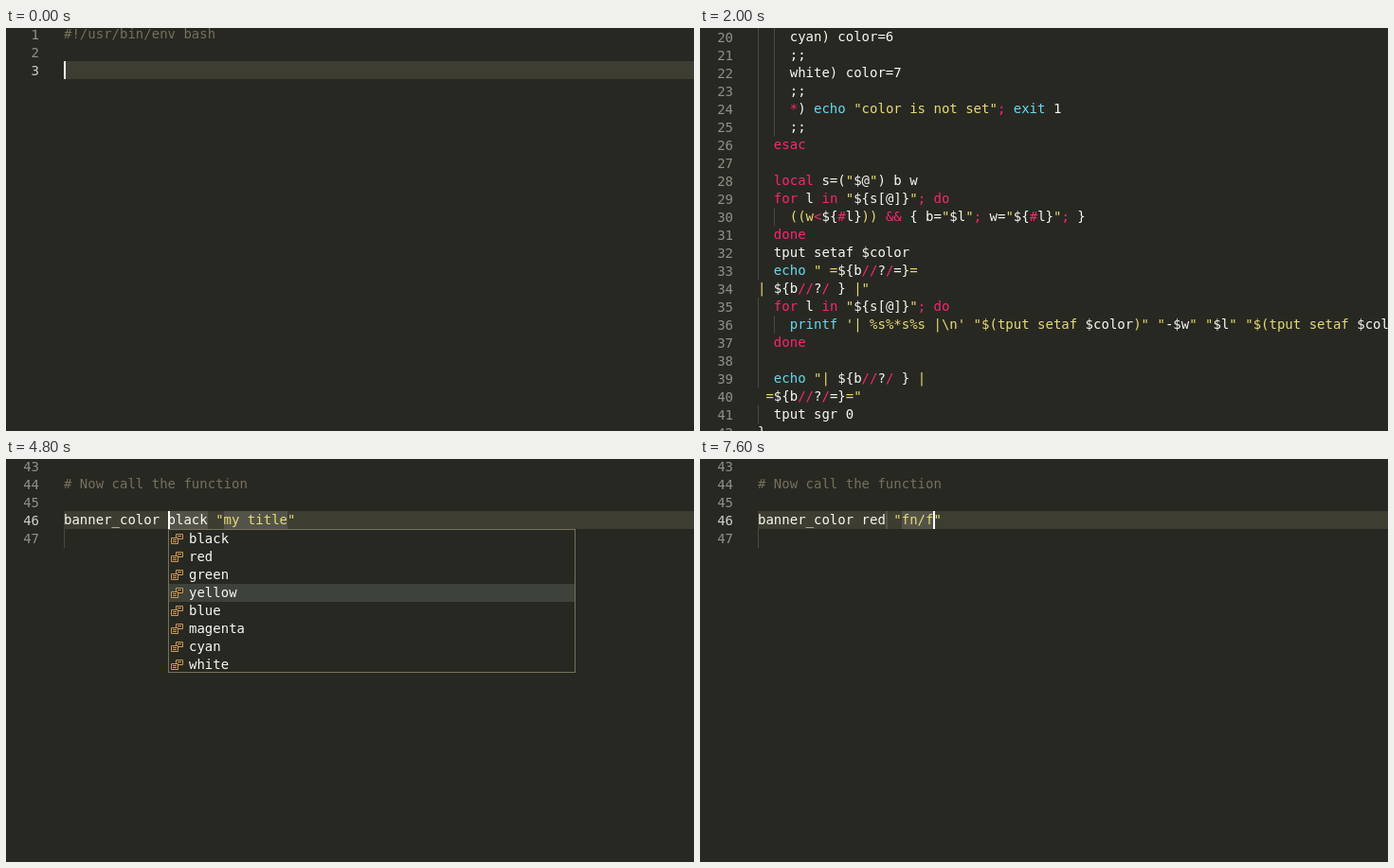
Recreate the animation shown at these times as an HTML page. Size 726x426 px, loop 8 s.

```html
<!DOCTYPE html>
<html lang="en">
<head>
<meta charset="utf-8">
<title>Bash snippets</title>
<style>
  html, body { margin: 0; width: 100%; height: 100%; overflow: hidden; background: #282822; }
  #stage { display: block; width: 726px; height: 426px; }
  text { font: 14px "DejaVu Sans Mono", monospace; white-space: pre; fill: #f8f8f2; }
  .scene { visibility: hidden; }
  .scene.on { visibility: visible; }
  .num { fill: #90908a; text-anchor: end; }
  .num.active { fill: #d0d0ca; }
  .k { fill: #f92672; }
  .y { fill: #e6db74; }
  .c { fill: #66d9ef; }
  .i { fill: #66d9ef; font-style: italic; }
  .g { fill: #a6e22e; }
  .m { fill: #75715e; }
  .d { fill: #b0b0aa; }
  .b { font-weight: bold; }
  .row { fill: #3e3d32; }
  .field { fill: #54534a; }
  .caret { fill: #fff; }
  .guide { fill: #4a4a43; }
  .box { fill: #282822; stroke: #75715e; }
  .sel { fill: #3d423b; }
  .thumb { fill: #4c4c48; }
  .snip { fill: #25252e; stroke: #c9c9cc; }
  .dots { stroke: #c9c9cc; stroke-dasharray: 1.5 1; }
  .word { fill: #282822; stroke: #cf9a55; }
</style>
</head>
<body>
<svg id="stage" width="726" height="426" viewBox="0 0 726 426"></svg>
<script>
const STEP = 400, ROW = 19, LEFT = 61, CHAR = 8.428;
const col = n => Math.round(LEFT + n * CHAR);
const esc = s => s.replace(/&/g, '&amp;').replace(/</g, '&lt;');
const rect = (cls, x, y, w, h) =>
  `<rect class="${cls}" x="${x}" y="${y}" width="${w}" height="${h}"/>`;

// "§k" switches to style k until the next mark
const paint = s => s.split('§').map((part, i) =>
  i ? `<tspan class="${part[0]}">${esc(part.slice(1))}</tspan>` : esc(part)).join('');
const text = (x, y, s, cls = '') => `<text class="${cls}" x="${x}" y="${y}">${paint(s)}</text>`;

const loop = '§kfor§w l §kin§y "§w${s[@]}§y"§k; do';
const fill = ch => '§w${b§k//§w?§k/§w' + ch + '}§y';
const tput = '"$(tput setaf §w$color§y)"';
const script = {
  20: '    cyan) color=6',
  21: '    ;;',
  22: '    white) color=7',
  23: '    ;;',
  24: '    §k*§w) §cecho §y"color is not set"§k; §cexit§w 1',
  25: '    ;;',
  26: '  §kesac',
  28: '  §klocal§w s=(§y"§w$@§y"§w) b w',
  29: '  ' + loop,
  30: '    §y((w§k<§w${§k#§wl}§y)) §k&&§w { b=§y"§w$l§y"§k;§w w=§y"§w${§k#§wl}§y"§k;§w }',
  31: '  §kdone',
  32: '  tput setaf $color',
  33: '  §cecho §y" =' + fill('=') + '=',
  34: '§y| ' + fill(' ') + ' |"',
  35: '  ' + loop,
  36: String.raw`    §cprintf §y'| %s%*s%s |\n' ` + tput + ' "§w-$w§y" "§w$l§y" ' + tput,
  37: '  §kdone',
  39: '  §cecho §y"| ' + fill(' ') + ' |',
  40: '§y =' + fill('=') + '="',
  41: '  tput sgr 0',
  42: '}',
  44: '§m# Now call the function'
};

function guides(n, y) {
  if (n === 47) return rect('guide', 61, y, 1, 20);
  if (n < 20 || n > 41 || n === 34 || n === 40) return '';
  const deep = n < 26 || n === 30 || n === 36;
  return rect('guide', 61, y, 1, ROW) + (deep ? rect('guide', 78, y, 1, ROW) : '');
}

// Lines first..last, the first one starting at y = top
function editor(first, last, top, active, lines, fields = [], caret = -1) {
  let out = '';
  for (let n = first; n <= last; n++) {
    const y = top + (n - first) * ROW;
    if (y > 426) break;
    if (n === active) {
      out += rect('row', LEFT, y, 665, ROW);
      for (const [a, b] of fields) out += rect('field', col(a), y, Math.max(2, col(b) - col(a)), ROW);
    }
    out += guides(n, y);
    out += text(35, y + 15, String(n), n === active ? 'num active' : 'num');
    if (lines[n]) out += text(LEFT, y + 14, lines[n]);
    if (n === active && caret >= 0) out += rect('caret', col(caret), y, 2, ROW);
  }
  return out;
}

const snipIcon = y => `<path class="snip" d="M4.5 ${y + 13}V${y + 3.5}h10V${y + 13}"/>` +
  `<path class="dots" d="M4 ${y + 14.5}h12"/>`;
const wordIcon = y => `<path class="word" d="M8.5 ${y + 4.5}h7v5h-7z M10 ${y + 6.5}h4"/>` +
  `<path class="word" d="M3.5 ${y + 8.5}h7v6h-7z M5 ${y + 10.5}h4 M5 ${y + 12.5}h4"/>`;

// "*" makes the next letter bold
const bold = s => s.replace(/\*(.)/g, '§b$1§w');

function list(x, y, w, items, sel, icon, textX, thumb = 0) {
  const h = items.length * ROW;
  let out = rect('box', x + .5, y + .5, w - 1, h - 1);
  out += `<svg x="${x}" y="${y + 1}" width="${w - 1}" height="${h - 2}">`;
  out += rect('sel', 1, sel * ROW, w - 2, ROW);
  if (thumb) out += rect('thumb', w - 11, 0, 10, thumb);
  items.forEach((s, i) => { out += icon(i * ROW) + text(textX, i * ROW + 14, bold(s)); });
  return out + '</svg>';
}

function preview(x, y, { doc, code }) {
  const h = (doc.length + code.length) * ROW + 18;
  let out = rect('box', x + .5, y + .5, 340, h);
  doc.forEach((s, i) => { out += text(x + 6, y + 19 + i * ROW, s, 'd'); });
  code.forEach((s, i) => { out += text(x + 6, y + 27 + (doc.length + i) * ROW, s); });
  return out + text(x + 310, y + 15, '×', 'd b');
}

const help = {
  color: {
    doc: ['function: print a color banner. exa', 'mple: banner_color red "my title"', '(User Snippet)'],
    code: ['§ifunction§g banner_color()§w {', '    §klocal§w color=$1', '    §cshift', '',
      '    §kcase§w $color §kin', '        black) color=0', '        ;;', '        red) color=1']
  },
  simple: {
    doc: ['function: print a simple banner. ex', 'ample: banner_simple "my title" (Us', 'er Snippet)'],
    code: ['§ifunction§g banner_simple()§w {', '    §klocal§w msg=§y"* §w$*§y *"',
      '    §klocal§w edge=§y$(§cecho§y "§w$msg§y" §k|§y sed \'s/./*/g\')',
      '    §cecho§y "§w$edge§y"', '    §cecho§y "§w$msg§y"', '    §cecho§y "§w$edge§y"', '}']
  },
  callColor: {
    doc: ['call banner_color function (User Sn', 'ippet)'],
    code: ['banner_color black §y"my title"']
  },
  callSimple: {
    doc: ['call banner_simple function (User S', 'nippet)'],
    code: ['banner_simple §y"my title"']
  }
};

const fnItems = ['*f*n banner color', '*f*n banner simple', '*fu*nc', '*fu*nc args', '*fu*nc args count',
  '*fu*nc ret val', '*for i*n', '*for i*n column', '*fx ba*nner color', '*fx ba*nner simple',
  'if *file *newer', 'if *file *not empty'];
const fItems = fnItems.map(s => s.replace('*n', 'n'));
const fxItems = ['*f*x banner color', '*f*x banner simple', 'if *file e*xecutable', 'if *file e*xists'];
const colors = ['black', 'red', 'green', 'yellow', 'blue', 'magenta', 'cyan', 'white'];

const popup = (x, y, items, sel, info, thumb) =>
  list(x, y, 330, items, sel, snipIcon, 22, thumb) + preview(x + 330, y, help[info]);
const start = (typed, caret) =>
  editor(1, 3, -3, 3, { 1: '§m#!/usr/bin/env bash', 3: typed }, [], caret);
const end = (typed, caret, last = 46, fields) =>
  editor(43, last, -2, 46, { ...script, 46: typed }, fields, caret);
const pick = (sel, caret) =>
  end('banner_color black §y"my title"', caret, 47, [[13, 18], [20, 28]]) +
  list(171, 74, 430, colors, sel, wordIcon, 22);
const title = (s, caret) =>
  end(`banner_color red §y"${s}"`, caret, 47, [[16, 16], [18, 18 + s.length]]);
const typing = s => title(s, 18 + s.length);

const scenes = [
  start('', 0),
  start('f') + popup(69, 54, fItems, 0, 'color', 110),
  start('fn') + popup(78, 54, fnItems, 0, 'color', 182),
  start('fn') + popup(78, 54, fnItems, 1, 'simple', 182),
  start('fn', 2) + popup(78, 54, fnItems, 0, 'color', 182),
  editor(20, 46, 0, 46, script),
  editor(30, 46, 0, 46, script),
  end(''),
  end('f') + popup(69, 74, fItems, 0, 'color', 110),
  end('fx', 2) + popup(78, 74, fxItems, 0, 'callColor'),
  end('fx') + popup(78, 74, fxItems, 1, 'callSimple'),
  end('fx', 2) + popup(78, 74, fxItems, 0, 'callColor'),
  pick(3, 13),
  pick(2, -1),
  pick(1, 13),
  title('my title', 16),
  ...[1, 2, 3, 4].map(n => typing('fn/f'.slice(0, n)))
];

const stage = document.getElementById('stage');
stage.innerHTML = scenes.map(s => `<g class="scene">${s}</g>`).join('');
const groups = [...stage.children];
let shown = -1;

function draw(now) {
  const i = Math.floor(now / STEP) % scenes.length;
  if (i !== shown) {
    if (shown >= 0) groups[shown].classList.remove('on');
    groups[i].classList.add('on');
    shown = i;
  }
}

const t0 = performance.now();
function tick() {
  draw(performance.now() - t0);
  requestAnimationFrame(tick);
}
tick();
</script>
</body>
</html>
```
